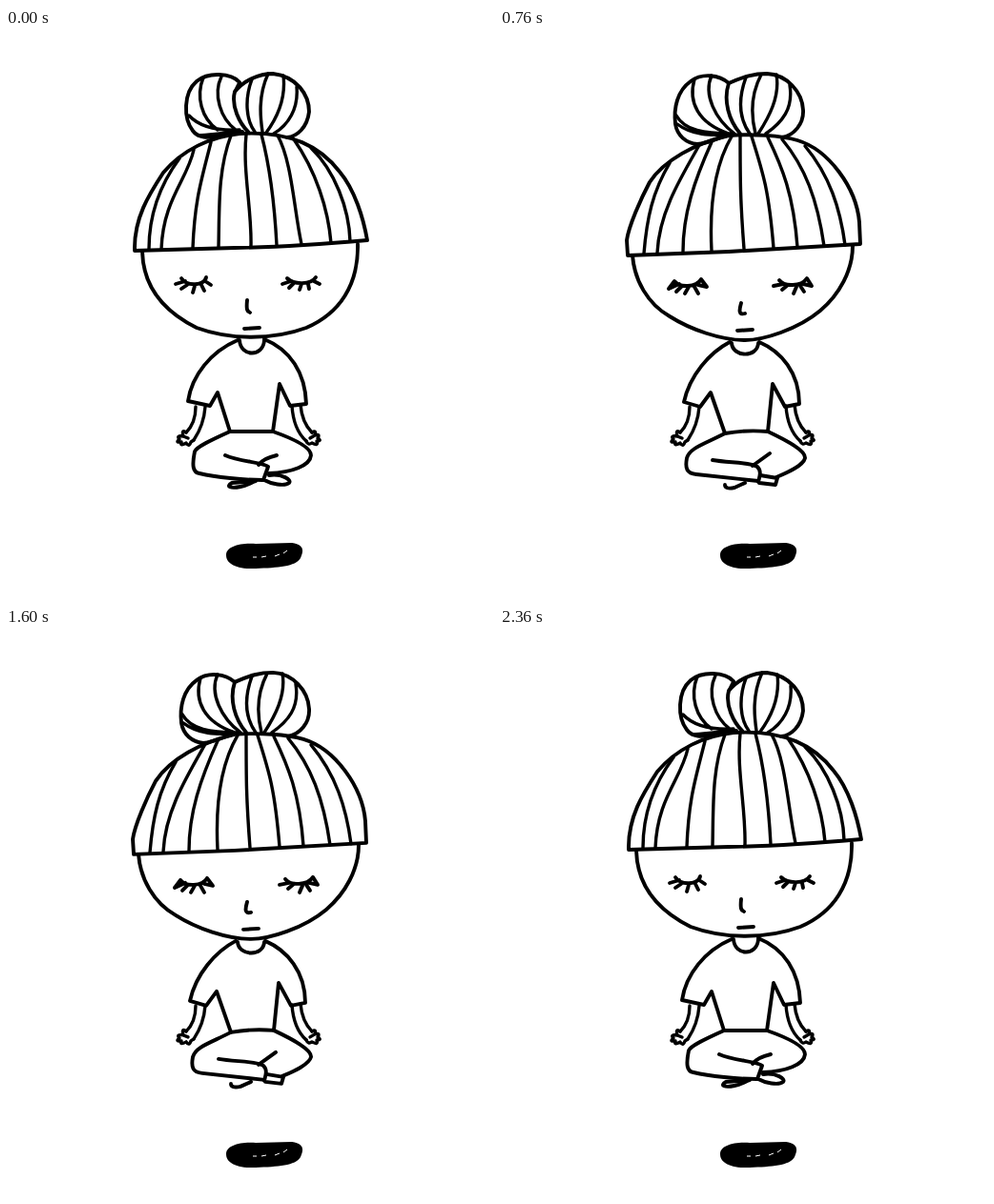
Write an HTML page that moves like this. It is 512x600 px and loops after 2400 ms.

```html
<!DOCTYPE html>
<html lang="en">
<head>
<meta charset="utf-8">
<title>Floating meditation</title>
<style>
  html, body { margin: 0; width: 100%; height: 100%; overflow: hidden; background: #fff; }
  svg { display: block; width: 512px; height: 600px; }
  .ink { fill: none; stroke: #000; stroke-width: 3.9; stroke-linecap: round; stroke-linejoin: round; }
  .thin { stroke-width: 3.4; }
  .glint { fill: none; stroke: #fff; stroke-width: 1; }
</style>
</head>
<body>
<svg viewBox="0 0 512 600">
  <defs>
    <g id="arms">
      <path class="thin" d="M199 398C199 408 196 418 189 425M209 398C208 412 203 424 197 433M300 397C301 412 306 426 315 434M309 396C310 408 314 418 321 425"/>
      <path class="thin" d="M189 425Q184 421 186 429Q178 428 182 432Q177 436 184 435Q182 440 189 436Q192 441 194 435L197 433M186 429L191 431"/>
      <path class="thin" d="M321 425Q326 422 324 428Q330 426 327 431Q332 434 326 434Q328 440 321 436Q317 439 315 434M324 428L319 431"/>
    </g>
  </defs>

  <g id="floating" class="ink">
    <!-- buns -->
    <path d="M240 58C230 49 212 47 200 56C186 66 182 84 184 101C186 113 195 121 207 122C220 121 229 115 241 112"/>
    <path d="M240 58C256 51 266 48 280 48C301 49 317 67 318 86C319 101 308 113 296 115M240 58C234 76 240 97 252 111"/>
    <path class="thin" d="M204 54C197 78 208 100 240 111M222 50C213 70 226 96 246 111M185 92C194 108 215 111 242 111M186 101C202 113 220 113 242 112"/>
    <path class="thin" d="M258 52C250 74 250 94 262 111M274 49C262 72 264 95 268 111M290 49C294 72 282 94 271 111M304 60C308 85 296 99 279 111"/>
    <!-- fringe -->
    <path d="M134 239L133 223C135 208 148 179 157 162C172 139 205 121 240 113C265 111 295 113 312 118C345 128 374 168 377 204L378 227Q310 231 240 235L134 239"/>
    <path class="thin" d="M178 142C160 172 154 200 151 237M208 125C188 160 167 195 165 236M222 120C204 160 192 195 192 235M243 114C222 150 220 195 222 234M252 113C252 159 252 180 256 232"/>
    <path class="thin" d="M264 114C276 152 282 170 287 231M281 115C296 146 308 175 312 230M296 117C320 146 333 180 340 229M320 124C346 155 357 190 362 228"/>
    <!-- face -->
    <path d="M139 239C141 265 155 290 178 303C200 317 232 328 257 328C276 328 312 317 336 297C356 280 370 255 370 229"/>
    <path d="M177 274L183 266C188 273 206 273 211 264L217 272L208 270M177 274L188 269M185 277L191 271M194 279L198 272M208 279L204 272"/>
    <path d="M287 271L297 269M293 265C298 272 316 272 322 263L327 271L318 269M296 275L302 270M308 279L311 272M319 277L315 271"/>
    <path d="M253 289C251 296 250 302 257 300M249 318L265 317"/>
    <!-- shirt -->
    <path d="M243 331C244 346 270 347 271 331M241 330C220 341 199 365 193 393L210 398L221 383L236 426Q258 422 281 424L286 374L299 398L314 395C314 362 295 340 272 330"/>
    <use href="#arms"/>
    <!-- legs -->
    <path d="M236 426C215 437 199 441 196 452C194 463 196 468 206 469L271 476M281 424C300 433 321 444 320 452C318 460 302 467 290 472"/>
    <path d="M223 454C240 457 262 456 270 461C275 466 272 472 271 477M283 447L265 460M236 480Q236 485 246 483L257 478M273 470L291 473L289 480L272 478"/>
  </g>

  <g id="resting" class="ink">
    <!-- buns -->
    <path d="M245 57C236 47 212 46 200 56C186 68 186 95 196 108C201 115 212 117 226 112L248 109"/>
    <path d="M240 67C250 55 265 48 280 48C305 51 318 70 318 88C316 105 305 114 295 115M240 67C236 82 245 100 254 109"/>
    <path class="thin" d="M207 52C199 72 205 95 222 107M226 51C217 70 225 95 241 107M192 92C205 106 225 108 245 107M202 113C215 112 232 110 248 109M245 57L240 67"/>
    <path class="thin" d="M258 54C250 75 252 97 261 109M275 48C264 72 267 95 269 109M291 50C294 75 284 95 273 110M305 62C307 85 296 102 281 111"/>
    <!-- fringe -->
    <path d="M135 234C134 200 150 175 165 152C185 128 215 114 245 111C300 108 330 125 350 151C366 170 375 200 379 223Q300 230 240 231L135 234"/>
    <path class="thin" d="M182 137C165 160 150 190 150 232M197 128C190 160 165 180 163 232M215 120C205 160 198 180 196 231M236 113C222 150 224 190 223 230M252 112C248 150 258 190 257 229"/>
    <path class="thin" d="M268 112C278 150 282 190 284 228M285 113C300 140 302 190 310 227M302 117C325 150 338 190 341 226M320 126C345 150 360 190 361 224"/>
    <!-- face -->
    <path d="M143 235C144 275 170 300 200 315C235 328 280 328 315 315C350 300 370 270 369 227"/>
    <path d="M184 263C190 272 208 271 210 262M178 269L188 266M184 274L190 270M196 278L198 271M208 276L205 270M215 270L209 266"/>
    <path d="M295 263C302 270 320 270 325 262M290 269L299 266M297 273L302 268M308 275L310 269M318 274L317 269M329 269L323 266"/>
    <path d="M253 286C252 296 253 298 256 299M250 316L266 315"/>
    <!-- shirt -->
    <path d="M245 328C246 346 270 346 271 328M243 328C215 340 195 365 191 392L214 397L222 383L235 424H280L287 374L298 397L315 395C314 362 298 338 271 327"/>
    <use href="#arms"/>
    <!-- legs -->
    <path d="M235 424C215 433 200 440 198 445C195 460 196 467 203 468C220 472 250 475 269 475M280 424C300 431 320 440 320 449C319 460 300 467 276 468"/>
    <path d="M230 449C245 456 270 456 275 461L270 475M284 449C275 451 268 455 265 459M262 476L237 478C230 482 236 484 246 482C255 480 258 477 262 476M276 470C290 468 300 475 297 478C292 482 278 479 271 475"/>
  </g>

  <g class="shadow">
    <path d="M231 554C231 545 245 541 262 542L300 541C312 543 313 548 309 557C304 566 285 567 262 568C240 569 231 562 231 554Z"/>
    <path class="glint" d="M259 556H263M268 556L273 555M282 555L287 553M291 552L295 549"/>
  </g>
  <g class="shadow">
    <path d="M241 551C241 543 246 540 255 541L286 540C292 542 293 549 291 556C289 559 285 559 283 561C275 563 262 563 252 562C246 560 241 558 241 551Z"/>
    <path class="glint" d="M249 546Q244 552 248 558M284 558L288 555"/>
  </g>
  <g class="shadow">
    <path d="M247 549C247 540 254 538 263 539C276 538 289 541 292 545C295 552 292 559 284 561C271 564 257 564 252 560C248 557 247 553 247 549Z"/>
    <path class="glint" d="M289 547Q291 551 288 557"/>
  </g>
  <g class="shadow">
    <path d="M238 553C237 545 247 542 264 541C283 541 295 542 297 550C298 559 285 562 267 563C250 565 239 562 238 553Z"/>
    <path class="glint" d="M244 547L249 545M271 544L277 545"/>
  </g>
</svg>
<script>
const LOOP = 2400, STEP = 40;
// [time, height] at the turning points of the float
const heights = [[0, 0], [20, 0], [420, -18.5], [760, 0], [860, 0], [1220, -18.5],
  [1620, 0], [2000, -14.5], [2320, 0], [LOOP, 0]];
// [start time, shadow drawing]
const shadowCues = [[0, 0], [160, 1], [320, 2], [520, 3], [680, 0], [960, 1], [1120, 2],
  [1320, 3], [1480, 0], [1760, 1], [1920, 2], [2080, 3], [2200, 0]];

const floating = document.getElementById('floating');
const resting = document.getElementById('resting');
const shadows = document.querySelectorAll('.shadow');
const show = (el, on) => el.setAttribute('visibility', on ? 'visible' : 'hidden');

function heightAt(t) {
  const i = heights.findIndex(([time]) => time > t);
  const [t0, y0] = heights[i - 1], [t1, y1] = heights[i];
  const eased = (1 - Math.cos(Math.PI * (t - t0) / (t1 - t0))) / 2;
  return y0 + (y1 - y0) * eased;
}

function draw(now) {
  const t = Math.floor(now % LOOP / STEP) * STEP;
  const atRest = t < 40 || t >= 2320;
  show(resting, atRest);
  show(floating, !atRest);
  floating.setAttribute('transform', `translate(0 ${heightAt(t)})`);
  const current = shadowCues.filter(([start]) => start <= t).pop()[1];
  shadows.forEach((shadow, i) => show(shadow, i === current));
}

const start = performance.now();
function tick() {
  draw(performance.now() - start);
  requestAnimationFrame(tick);
}
tick();
</script>
</body>
</html>
```
